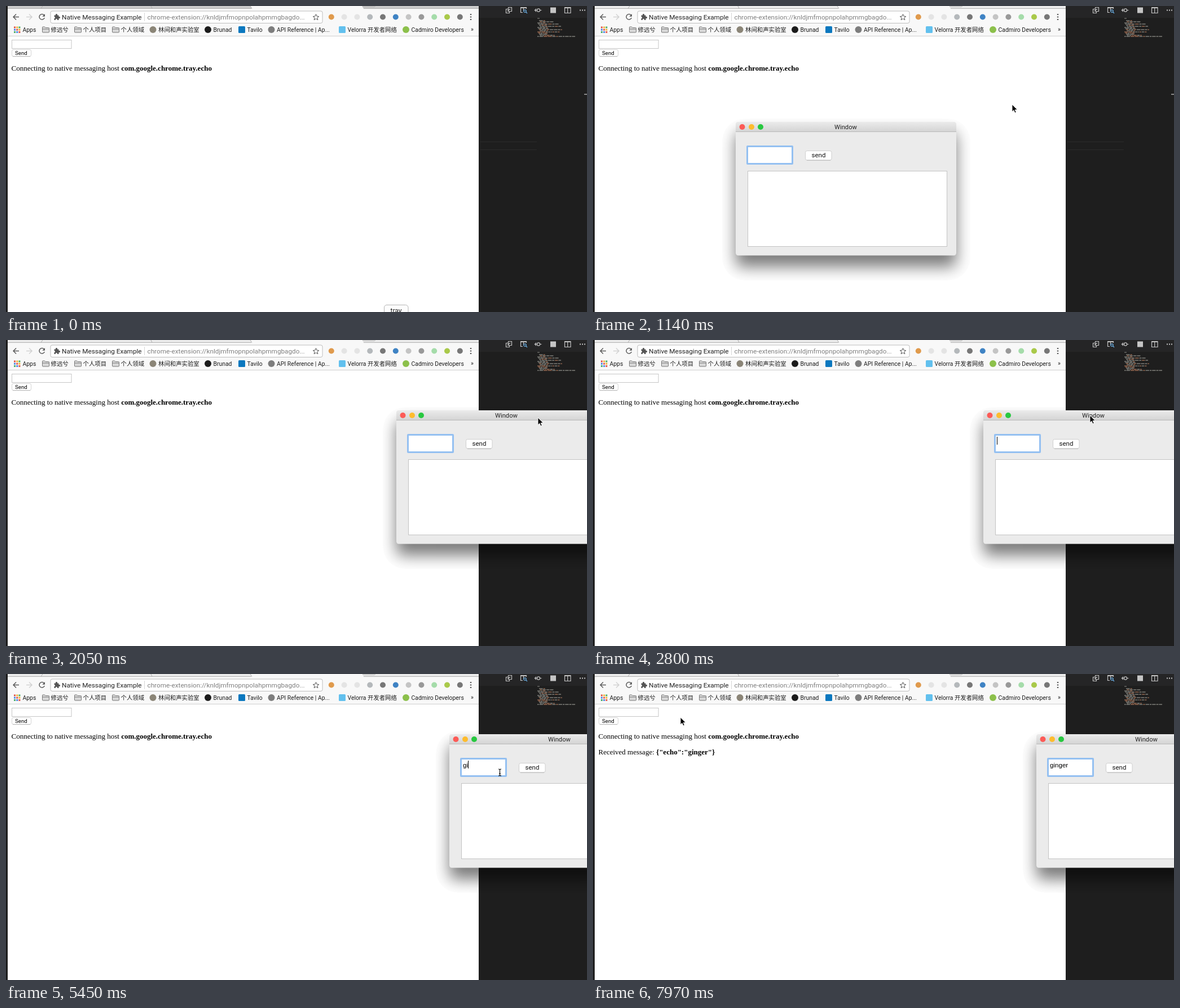
An HTML page that plays this animation: 1030x544 px, repeating every 8 s.

```html
<!DOCTYPE html>
<html lang="en">
<head>
<meta charset="utf-8">
<title>Native Messaging Example</title>
<style>
  html, body { margin: 0; width: 100%; height: 100%; overflow: hidden; background: #1e1e1e; }
  svg { display: block; width: 1030px; height: 544px; }
  text { font-family: Roboto, "Noto Sans CJK SC", "Noto Sans CJK", sans-serif; fill: #222; white-space: pre; }
  .bar { font-size: 11.75px; }
  .mark { font-size: 10.4px; fill: #1c1c1c; }
  .page { font: 13px "Liberation Serif", serif; fill: #000; }
  .page tspan { font-weight: bold; }
  .field { font: 11.6px "Liberation Sans", sans-serif; fill: #000; }
  .line { fill: none; stroke-width: 1.5; }
</style>
</head>
<body>
<svg viewBox="0 0 1030 544" xmlns="http://www.w3.org/2000/svg">
  <defs>
    <linearGradient id="title" x1="0" y1="0" x2="0" y2="1">
      <stop offset="0" stop-color="#ebebeb"/><stop offset="1" stop-color="#d3d3d3"/>
    </linearGradient>
    <filter id="blur" x="-20%" y="-25%" width="140%" height="150%"><feGaussianBlur stdDeviation="14"/></filter>
    <clipPath id="halo"><rect x="-24" y="-5" width="440" height="288" rx="40"/></clipPath>
    <path id="folder" fill="#d9d9d9" stroke="#777" d="M.5 9.5V1.5Q.5.5 1.5.5H4.5L6 2H11.5Q12.5 2 12.5 3V9.5Q12.5 10.5 11.5 10.5H1.5Q.5 10.5.5 9.5ZM.5 4.5H12.5"/>
  </defs>

  <!-- editor -->
  <rect width="1030" height="544" fill="#1e1e1e"/>
  <rect x="838" width="192" height="21" fill="#252526"/>
  <path d="M841 241.500H941M841 255.500H941" stroke="#2b2b2b"/>
  <rect x="1025" y="156" width="5" height="2" fill="#8a8a8a"/>
  <g id="map"></g>
  <g fill="none" stroke="#c5c5c5" stroke-width="1.2">
    <path d="M890 5.500H886.500V12.500H892.500V9.500M890.500 2.500H896.500V9.500H890.500ZM889 9L894 5"/>
    <path d="M916 11.500H912.500V2.500H922.500V5M912.500 3.500H922.500M917.500 3V8"/>
    <circle cx="920" cy="9" r="2.200" stroke="#6bb1e8"/><path d="M921.500 10.500L924 13" stroke="#6bb1e8"/>
    <circle cx="944" cy="7.500" r="2.600"/><path d="M937.500 7.500H941.400M946.600 7.500H949.500M940 5L937.500 7.500L940 10"/>
    <path d="M990.500 2.500H1001V12.500H990.500ZM990.500 3.500H1001M995.700 3V12.500"/>
  </g>
  <rect x="965" y="2.500" width="10" height="10" fill="#c5c5c5"/>
  <path d="M1017 7.500h2m2 0h2m2 0h2" stroke="#c5c5c5" stroke-width="2"/>

  <!-- browser -->
  <rect x="3" width="835" height="544" fill="#fff"/>
  <rect id="strip" x="3" width="835" height="5"/>
  <path d="M433 0H631L634 5H436Z" fill="#f8f8f8"/>
  <rect x="3" y="5" width="835" height="48" fill="#f8f8f8"/>
  <path d="M3 4.500H435M634 4.500H838M62 4.500L65 0M257 0L259 4.500M433 0L436 4.500M632 0Q633 1.500 636 1.500H653L655 0" fill="none" stroke="#aaa" stroke-width=".9"/>
  <path d="M3 53.500H838" stroke="#cfcfcf"/>
  <path class="line" d="M23 19.500H13.500M18 14.500L13 19.500L18 24.500" stroke="#5c5c5c"/>
  <path class="line" d="M36 19.500H45.500M41 14.500L46 19.500L41 24.500" stroke="#d2d2d2"/>
  <path class="line" d="M67.500 16.200A4.800 4.800 0 1 0 68.300 21" stroke="#5c5c5c"/>
  <path d="M69 14V18.700H64.300Z" fill="#5c5c5c"/>
  <rect x="79" y="9" width="482" height="21.500" rx="3" fill="#fff" stroke="#bcbcbc"/>
  <path d="M85.500 16.500H88A1.700 1.700 0 1 1 91 16.500H93.500V19A1.700 1.700 0 1 1 93.500 22V25H90.800A1.600 1.600 0 1 0 88 25H85.500V22A1.500 1.500 0 1 0 85.500 19Z" fill="#555"/>
  <text class="bar" x="99" y="24">Native Messaging Example</text>
  <path d="M245.500 12V27" stroke="#d5d5d5"/>
  <text class="bar" x="250.500" y="24" style="fill:#808080">chrome-extension://knldjmfmopnpolahpmmgbagdo...</text>
  <path d="M549.500 14.500L551 18.200L554.800 18.500L551.900 21L552.900 24.800L549.500 22.700L546.100 24.800L547.100 21L544.200 18.500L548 18.200Z" fill="none" stroke="#555"/>
  <g id="tools"></g>
  <path d="M824 14v2m0 2.500v2m0 2.500v2" stroke="#555" stroke-width="2.400"/>
  <g id="marks"></g>
  <text class="mark" x="824" y="45">»</text>

  <!-- page -->
  <rect x="10.500" y="60.500" width="105.500" height="15" fill="#fff" stroke="#c6c6c6"/>
  <rect x="10.500" y="77.500" width="34" height="12" rx="2.500" fill="#fff" stroke="#d4d4d4"/>
  <path d="M12 89.700H43" stroke="#b5b5b5"/>
  <text x="16" y="86.500" style="font-size:9.700px;fill:#000">Send</text>
  <text class="page" x="9.500" y="115">Connecting to native messaging host <tspan>com.google.chrome.tray.echo</tspan></text>
  <text class="page" id="reply" x="9.500" y="143">Received message: <tspan>{"echo":"ginger"}</tspan></text>

  <g id="label">
    <rect x="670.500" y="531.500" width="42.500" height="22" rx="4.500" fill="#fdfdfd" stroke="#b4b4b4"/>
    <text x="691.500" y="546" text-anchor="middle" style="font-size:12px">tray</text>
  </g>

  <!-- app window -->
  <g id="win">
    <g clip-path="url(#halo)">
      <rect y="20" width="391" height="239" rx="8" fill="#000" opacity=".52" filter="url(#blur)"/>
    </g>
    <rect y="1" width="391" height="237.500" rx="4.500" fill="#ebebeb"/>
    <path d="M0 19V6Q0 1 5 1H386Q391 1 391 6V19Z" fill="url(#title)"/>
    <path d="M0 18.500H391" stroke="#b9b9b9"/>
    <circle cx="11.500" cy="10" r="5" fill="#fc5b57"/>
    <circle cx="28" cy="10" r="5" fill="#fdbc2e"/>
    <circle cx="44" cy="10" r="5" fill="#28c840"/>
    <text x="195" y="14" text-anchor="middle" style="font-size:11.200px">Window</text>
    <rect x="19" y="43" width="83" height="34" rx="2" fill="#94c0f1"/>
    <rect x="22" y="46" width="77" height="28" fill="#fff"/>
    <rect x="123.500" y="52.500" width="46.500" height="16.500" rx="3" fill="#fff" stroke="#cecece"/>
    <path d="M126 69.300H168" stroke="#b9b9b9"/>
    <text x="147" y="64" text-anchor="middle" style="font-size:11.500px;fill:#111">send</text>
    <rect x="21.500" y="88.500" width="353" height="134" fill="#fff" stroke="#c3c3c3"/>
    <text class="field" id="typed" x="24" y="60"></text>
    <rect id="caret" y="48" width="1" height="14" fill="#000"/>
  </g>

  <path id="arrow" d="M0 0V13L3 10.300L5 15L7.200 14L5.200 9.500H9.300Z" fill="#000" stroke="#fff" stroke-width=".9"/>
  <path id="beam" d="M-2.500 -6Q0 -6 0 -4.500Q0 -6 2.500 -6M0 -5V5M-2.500 6Q0 6 0 4.500Q0 6 2.500 6M-1.500 2H1.500" fill="none" stroke="#000" stroke-width="1.100"/>
</svg>
<script>
const $ = id => document.getElementById(id);
const rect = (x, y, w, h, fill, rx = 0) =>
  `<rect x="${x}" y="${y}" width="${w}" height="${h}" rx="${rx}" fill="${fill}"/>`;
const dot = (x, y, r, fill) => `<circle cx="${x}" cy="${y}" r="${r}" fill="${fill}"/>`;

// toolbar buttons, evenly spaced
const tints = '#e09a4c #e4e4e4 #e4e4e4 #b4b8bb #777 #3f83c4 #c4c4c4 #999 #a5dcaa #a9c94a #777';
$('tools').innerHTML = tints.split(' ').map((c, i) => dot(576.8 + i * 22.8, 19.5, 5, c)).join('');

// bookmarks: icon, x, text, colour
const folder = x => `<use href="#folder" x="${x}" y="36.5"/>`;
const circle = (x, c) => dot(x + 6, 42, 6, c);
const square = (x, c) => rect(x, 36, 12, 12, c, 1.5);
const hues = ['#e2574c', '#f2b632', '#4caf6a', '#4a86e8'];
const grid = x => Array.from({ length: 9 }, (_, i) =>
  rect(x + i % 3 * 4.2, 36.5 + Math.floor(i / 3) * 4.2, 3, 3, hues[i % 4])).join('');
$('marks').innerHTML = [
  [grid, 14, 'Apps'],
  [folder, 64, '修远兮'],
  [folder, 121, '个人项目'],
  [folder, 188, '个人领域'],
  [circle, 254.5, '林间和声实验室', '#8b8577'],
  [circle, 352, 'Brunad', '#1b1b1b'],
  [square, 412, 'Tavilo', '#0b78bf'],
  [circle, 464.5, 'API Reference | Ap...', '#7d7d7d'],
  [square, 590, 'Velorra 开发者网络', '#62c0ee'],
  [circle, 703, 'Cadmiro Developers', '#8cc04b']
].map(([icon, x, s, c]) => icon(x, c) + `<text class="mark" x="${x + 15.5}" y="45.5">${s}</text>`).join('');

// code overview: short random words on indented lines
let seed = 7;
const random = () => (seed = seed * 16807 % 2147483647) / 2147483647;
const rows = 17;
let map = rect(942, 21.5, 4, 1, '#8b8b85');
for (let i = 2; i < rows; i++) {
  let x = 942 + i % 4 * 1.5;
  const end = i === rows - 1 ? 1006 : x + 10 + 36 * random() ** 2;
  while (x < end) {
    const w = 2 + 5 * random();
    map += rect(x, 21.5 + i * 2, w, 1.2, random() < .7 ? '#96968f' : '#b37a5c');
    x += w + 1;
  }
}
$('map').innerHTML = map;

// the screen refreshes at a fixed interval
const gap = 148.5, phase = .67;
const snap = t => Math.max(0, gap * (Math.floor(t / gap - phase) + phase));

// key points [ms, x, y], eased between
const winPath = [
  [1287, 253, 205], [1436, 615, 116], [2030, 692, 124], [2773, 692, 124], [3515, 786, 107], [3660, 786, 106]
];
const mousePath = [
  [248, 690, 560], [1139, 743, 175], [1287, 510, 216], [1436, 871, 127], [2030, 943, 138],
  [2773, 881, 134], [3515, 975, 117], [4109, 349, 250], [4550, 890, 185], [4850, 875.5, 175],
  [6040, 875.5, 175], [6630, 919, 169], [7222, 914, 158], [7965, 155, 77]
];
function along(path, t) {
  const i = path.findIndex(k => k[0] > t);
  if (i < 1) return path.at(i).slice(1);
  const [t0, x0, y0] = path[i - 1], [t1, x1, y1] = path[i];
  const f = (t - t0) / (t1 - t0), e = f * f * (3 - 2 * f);
  return [x0 + (x1 - x0) * e, y0 + (y1 - y0) * e];
}

const show = (id, on) => $(id).setAttribute('visibility', on ? 'visible' : 'hidden');
const move = (id, x, y) => $(id).setAttribute('transform', `translate(${x} ${y})`);

function draw(time) {
  const t = snap(time), open = t > 480;
  const [wx, wy] = along(winPath, t).map(Math.round), [mx, my] = along(mousePath, t);
  $('strip').setAttribute('fill', open ? '#ebebeb' : '#cbcbcb');
  show('label', time < 150);
  show('reply', t > 6900);
  show('win', open);
  move('win', wx, wy);

  const typing = t > 5440;
  const count = typing ? Math.min(6, Math.floor(2 + (t - 5440) / 112)) : 0;
  $('typed').textContent = 'ginger'.slice(0, count);
  $('caret').setAttribute('x', Math.round(24 + (count && $('typed').getComputedTextLength())));
  const blink = Math.floor((t - 1060) / 582) % 2 === 0;
  show('caret', t > 1140 && (typing ? t < 6400 : blink));

  const inField = open && mx > wx + 19 && mx < wx + 102 && my > wy + 43 && my < wy + 77;
  show('arrow', !inField);
  show('beam', inField);
  move('arrow', mx, my);
  move('beam', mx, my);
}

const start = performance.now();
function loop() {
  draw((performance.now() - start) % 8000);
  requestAnimationFrame(loop);
}
loop();
</script>
</body>
</html>
```
